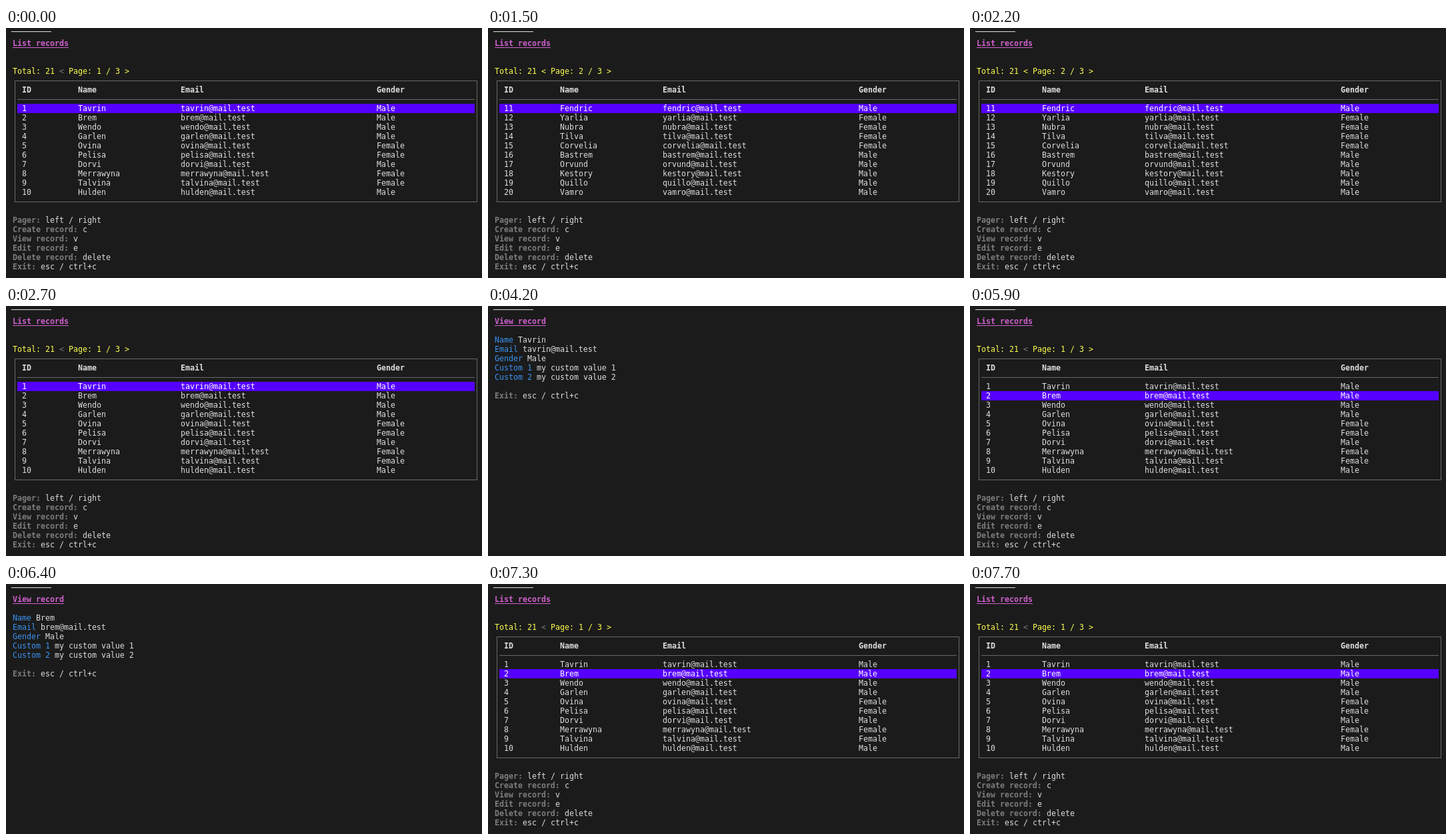
An HTML page with a canvas for the animation above (8 s loop, 714 px wide and 376 px high).

```html
<!DOCTYPE html>
<html lang="en">
<head>
<meta charset="utf-8">
<title>Records</title>
<style>
html, body { margin: 0; width: 100%; height: 100%; overflow: hidden; background: #1b1b1b; }
canvas { display: block; width: 714px; height: 376px; }
</style>
</head>
<body>
<canvas id="stage" width="714" height="376"></canvas>
<script>
const ctx = document.getElementById('stage').getContext('2d');
const LOOP = 8000, CELL = 7, ROW = 14, LEFT = 10, PAGE_SIZE = 10;
const COLOR = {
  back: '#1b1b1b', text: '#dedede', bright: '#ffffff', dim: '#7d7d7d', line: '#686868',
  title: '#d060ce', yellow: '#ffff50', blue: '#3b94f2', select: '#5500ff'
};
const NAMES = ('Tavrin Brem Wendo Garlen Ovina Pelisa Dorvi Merrawyna Talvina Hulden ' +
  'Fendric Yarlia Nubra Tilva Corvelia Bastrem Orvund Kestory Quillo Vamro Haldrin').split(' ');
const FEMALE = new Set([5, 6, 8, 9, 12, 13, 14, 15]);
const RECORDS = NAMES.map((name, i) => ({
  id: i + 1,
  name,
  email: name.toLowerCase() + '@mail.test',
  gender: FEMALE.has(i + 1) ? 'Female' : 'Male'
}));
const PAGES = Math.ceil(RECORDS.length / PAGE_SIZE);
const COLUMNS = [['ID', 24], ['Name', 108], ['Email', 262], ['Gender', 556]];
const HELP = [
  ['Pager:', 'left / right'], ['Create record:', 'c'], ['View record:', 'v'],
  ['Edit record:', 'e'], ['Delete record:', 'delete'], ['Exit:', 'esc / ctrl+c']
];

// Each scene holds from its start time until the next one.
const SCENES = [
  { at: 0, page: 1, row: 0 },
  { at: 900, page: 2, row: 0 },
  { at: 1600, page: 3, row: 0 },
  { at: 1900, page: 2, row: 0 },
  { at: 2700, page: 1, row: 0 },
  { at: 3600, view: 0 },
  { at: 5400, page: 1, row: 0 },
  { at: 5900, page: 1, row: 1 },
  { at: 6400, view: 1 },
  { at: 7300, page: 1, row: 1 }
];

const baseline = line => 27 + line * ROW;

function write(str, x, line, color, bold) {
  ctx.font = (bold ? 'bold ' : '') + '11.627px "DejaVu Sans Mono", monospace';
  ctx.fillStyle = color;
  ctx.fillText(str, x, baseline(line));
  return x + str.length * CELL;
}

function rect(x, y, w, h, color) {
  ctx.fillStyle = color;
  ctx.fillRect(x, y, w, h);
}

function pair(label, value, line, color, bold) {
  const x = write(label, LEFT, line, color, bold);
  write(value, x + CELL, line, COLOR.text);
}

function heading(str) {
  const end = write(str, LEFT, 0, COLOR.title, true);
  rect(LEFT, 29, end - LEFT, 1, COLOR.title);
}

function drawList({ page, row }) {
  heading('List records');
  const arrow = on => on ? COLOR.yellow : COLOR.dim;
  let x = write(`Total: ${RECORDS.length} `, LEFT, 3, COLOR.yellow);
  x = write('< ', x, 3, arrow(page > 1));
  x = write(`Page: ${page} / ${PAGES} `, x, 3, COLOR.yellow);
  write('>', x, 3, arrow(page < PAGES));

  const start = (page - 1) * PAGE_SIZE;
  const rows = RECORDS.slice(start, start + PAGE_SIZE);
  ctx.strokeStyle = COLOR.line;
  ctx.lineWidth = 1;
  ctx.strokeRect(13.5, 79.5, 693, 42 + rows.length * ROW);
  rect(17, 107, 686, 1, COLOR.line);
  for (const [label, left] of COLUMNS) write(label, left, 5, COLOR.text, true);

  rect(17, 114 + row * ROW, 686, ROW, COLOR.select);
  rows.forEach((record, i) => {
    const color = i === row ? COLOR.bright : COLOR.text;
    for (const [label, left] of COLUMNS) {
      write(String(record[label.toLowerCase()]), left, 7 + i, color);
    }
  });
  HELP.forEach(([label, keys], i) => pair(label, keys, 9 + rows.length + i, COLOR.dim, true));
}

function drawView({ view }) {
  const { name, email, gender } = RECORDS[view];
  heading('View record');
  [['Name', name], ['Email', email], ['Gender', gender],
    ['Custom 1', 'my custom value 1'], ['Custom 2', 'my custom value 2']
  ].forEach(([label, value], i) => pair(label, value, 2 + i, COLOR.blue));
  pair(...HELP[5], 8, COLOR.dim, true);
}

function draw(time) {
  const scene = SCENES.filter(s => s.at <= time).pop();
  rect(0, 0, 714, 376, COLOR.back);
  rect(8, 5, 60, 1, COLOR.text);
  if ('view' in scene) drawView(scene);
  else drawList(scene);
}

const begin = performance.now();
function frame() {
  draw((performance.now() - begin) % LOOP);
  requestAnimationFrame(frame);
}
frame();
</script>
</body>
</html>
```
